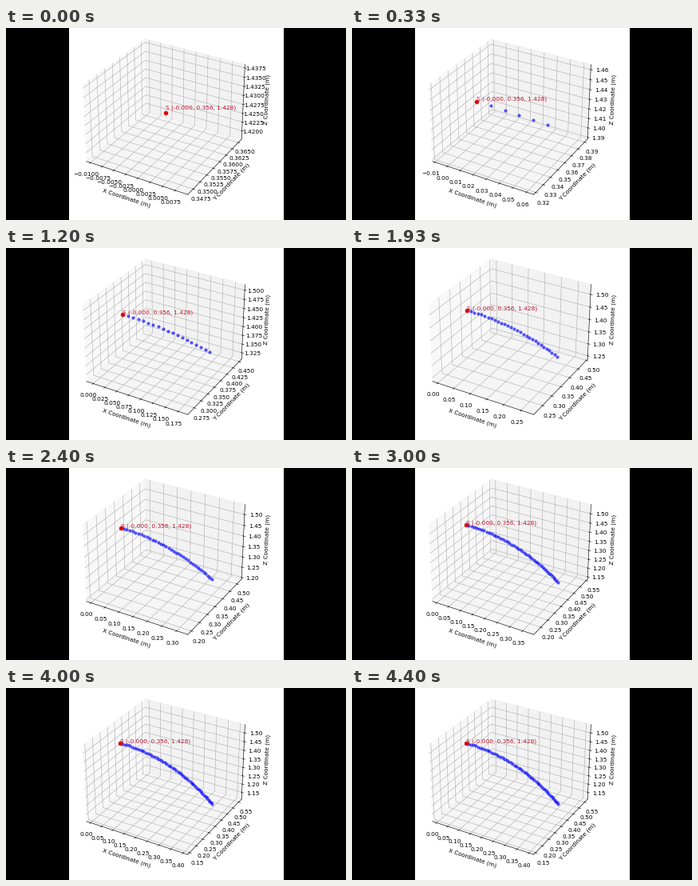
A matplotlib script that plays this animation: 426 px wide and 240 px high, repeating every 4470 ms.

```python
import numpy as np
import matplotlib.pyplot as plt
from matplotlib.animation import FuncAnimation
from matplotlib.patches import Rectangle
from matplotlib.ticker import MaxNLocator

W, H, DPI = 426, 240, 53.5
FRAMES, INTERVAL = 149, 30
STEP_MS = 1000 / 15
LAST = 50                       # step at which the flight ends
START = np.array([-0.00045, 0.356, 1.428])
PAD = 0.01

plt.rcParams.update({"font.family": "DejaVu Sans", "font.size": 10})
fig = plt.figure(figsize=((W + 0.01) / DPI, (H + 0.01) / DPI), dpi=DPI,
                 facecolor="black")
fig.add_artist(Rectangle((79 / W, 0), 269 / W, 1, fc="white", ec="none",
                         transform=fig.transFigure, zorder=-1))

ax = fig.add_axes([83.7 / W, 17.6 / H, 226 / W, 226 / H], projection="3d")
ax.patch.set_visible(False)
ax.set_xlabel("X Coordinate (m)")
ax.set_ylabel("Y Coordinate (m)")
ax.set_zlabel("Z Coordinate (m)")

path, = ax.plot([], [], [], "o", color="blue", ms=20 ** 0.5, mew=1, alpha=0.6)
ax.plot(*START[:, None], "o", color="#d8000f", ms=6.4, mew=1, zorder=2.5)
ax.text(*(START + [0, 0, 0.001]), "S (-0.000, 0.356, 1.428)",
        color="#c4122f", zorder=4)

locator = MaxNLocator(nbins=9, steps=[1, 2, 2.5, 5, 10])


def position(k):
    """Points of the slowing, falling flight after k steps."""
    x = START[0] + 0.01113 * k - 6.2e-5 * k ** 2
    z = START[2] - (1.2e-4 - 8e-7 * k) * k ** 2
    return np.array([x, np.full_like(x, START[1]), z])


def fit_axis(axis, set_lim, mid, half):
    lo, hi = mid - half, mid + half
    axis.set_ticks([t for t in locator.tick_values(lo, hi) if lo <= t <= hi])
    margin = half / 24
    set_lim(lo - margin, hi + margin)


def update(i):
    step = min(int((i + 0.5) * INTERVAL / STEP_MS), LAST)
    pts = position(np.arange(step + 1.0))
    path.set_data_3d(*pts[:, 1:])

    low, high = pts.min(axis=1), pts.max(axis=1)
    mid = (low + high) / 2
    half = (high - low).max() / 2 + PAD
    fit_axis(ax.xaxis, ax.set_xlim, mid[0], half)
    fit_axis(ax.yaxis, ax.set_ylim, mid[1], half)
    fit_axis(ax.zaxis, ax.set_zlim, mid[2], half)
    return path,


anim = FuncAnimation(fig, update, frames=FRAMES, interval=INTERVAL,
                     repeat=True, repeat_delay=0, blit=False)
plt.show()
```
